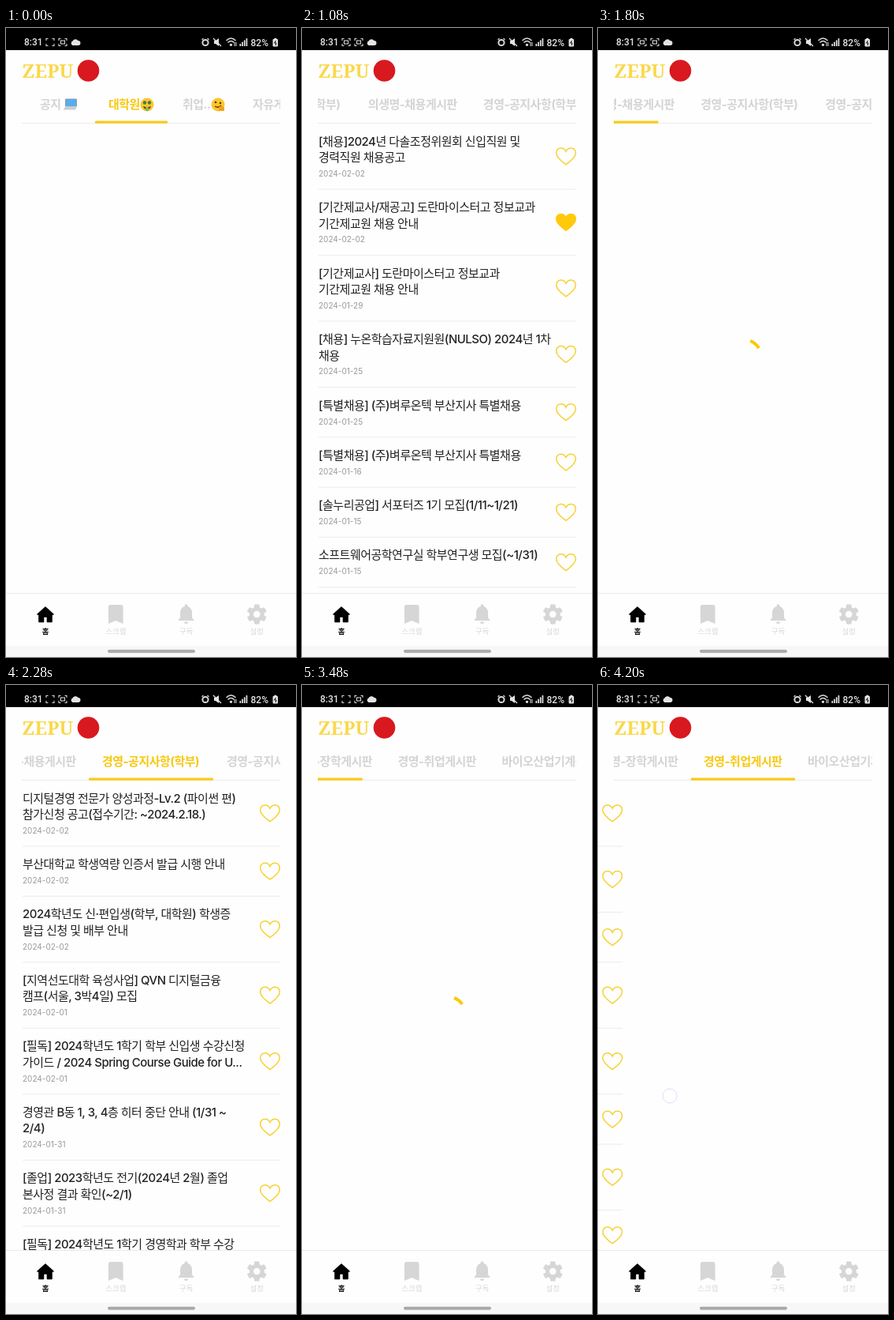
Recreate the animation shown at these times as an HTML page. Size 368 by 796 pixels, loop 4320 ms.

```html
<!DOCTYPE html>
<html lang="ko">
<head>
<meta charset="utf-8">
<title>게시판</title>
<style>
html, body { margin: 0; width: 100%; height: 100%; overflow: hidden; background: #fefefe; }
svg { display: block; }
text { font-family: Inter, "Noto Sans CJK KR", "Noto Sans CJK", sans-serif; white-space: pre; }
.title { font-size: 15px; font-weight: 500; letter-spacing: -.5px; fill: #222; }
.date { font-size: 10px; fill: #999; }
.tab { font-size: 15px; font-weight: 700; letter-spacing: -.5px; fill: #d4d4d4; }
.tab.on { fill: #f7c810; }
.nav { font-size: 9.5px; text-anchor: middle; fill: #d8d8d8; }
.status { font: 500 12px Roboto, sans-serif; fill: #e4e4e4; }
.logo { font: 600 24px "Noto Serif", serif; fill: #fbd84c; }
</style>
</head>
<body>
<svg id="stage" width="368" height="796" viewBox="0 0 368 796"></svg>
<script>
const LOOP = 4320, STEP = 120, TAP = 280, YELLOW = '#f7cb1c';

// label, label x, tab x, tab width
const tabs = [
  ['공지', 43, 21, 92], ['대학원', 130, 113, 92], ['취업..', 224, 205, 92],
  ['자유게시판', 313, 297, 121], ['의생명-공지사항(학부)', 434, 418, 171],
  ['의생명-채용게시판', 606, 589, 146], ['경영-공지사항(학부)', 752, 735, 158],
  ['경영-공지사항(대학원)', 910, 893, 172], ['경영-장학게시판', 1081, 1065, 132],
  ['경영-취업게시판', 1213, 1197, 132], ['바이오산업기계공학과', 1345, 1329, 190]
];

// A title with "|" takes two lines; a leading "*" marks a saved post.
const lists = [
  { from: 480, to: 1680, posts: [
    ['[채용]2024년 다솔조정위원회 신입직원 및|경력직원 채용공고', '2024-02-02'],
    ['*[기간제교사/재공고] 도란마이스터고 정보교과|기간제교원 채용 안내', '2024-02-02'],
    ['[기간제교사] 도란마이스터고 정보교과|기간제교원 채용 안내', '2024-01-29'],
    ['[채용] 누온학습자료지원원(NULSO) 2024년 1차|채용', '2024-01-25'],
    ['[특별채용] (주)벼루온텍 부산지사 특별채용', '2024-01-25'],
    ['[특별채용] (주)벼루온텍 부산지사 특별채용', '2024-01-16'],
    ['[솔누리공업] 서포터즈 1기 모집(1/11~1/21)', '2024-01-15'],
    ['소프트웨어공학연구실 학부연구생 모집(~1/31)', '2024-01-15']] },
  { from: 2100, to: 3370, posts: [
    ['디지털경영 전문가 양성과정-Lv.2 (파이썬 편)|참가신청 공고(접수기간: ~2024.2.18.)', '2024-02-02'],
    ['부산대학교 학생역량 인증서 발급 시행 안내', '2024-02-02'],
    ['2024학년도 신·편입생(학부, 대학원) 학생증|발급 신청 및 배부 안내', '2024-02-02'],
    ['[지역선도대학 육성사업] QVN 디지털금융|캠프(서울, 3박4일) 모집', '2024-02-01'],
    ['[필독] 2024학년도 1학기 학부 신입생 수강신청|가이드 / 2024 Spring Course Guide for U...', '2024-02-01'],
    ['경영관 B동 1, 3, 4층 히터 중단 안내 (1/31 ~|2/4)', '2024-01-31'],
    ['[졸업] 2023학년도 전기(2024년 2월) 졸업|본사정 결과 확인(~2/1)', '2024-01-31'],
    ['[필독] 2024학년도 1학기 경영학과 학부 수강|신청 안내', '2024-01-31']] },
  { from: 3720, to: LOOP, posts: [
    ['[채용] 2024년 상반기 신입사원 공개채용|안내', '2024-02-02'],
    ['[인턴] 2024년 동계 체험형 청년인턴 모집|공고', '2024-02-01'],
    ['[채용] 경영지원 직무 신입사원 모집', '2024-01-31'],
    ['[추천채용] 회계 및 재무 분야 신입직원|추천 안내', '2024-01-30'],
    ['[채용설명회] 2024년 상반기 온라인|채용설명회 참가 안내', '2024-01-29'],
    ['[채용] 마케팅 직무 신입사원 모집', '2024-01-26'],
    ['[교육] 취업준비생을 위한 직무역량 강화|과정 모집', '2024-01-25'],
    ['[인턴] 해외영업 직무 인턴사원 모집', '2024-01-24']] }
];

// start, duration, easing power, scroll position of the tab strip
const scrolls = [
  [120, TAP, 2, 66.5], [600, 960, 2.7, 605], [1680, TAP, 2, 630],
  [2280, 960, 3, 1113], [3370, TAP, 2, 1079]
];
const taps = [[120, 2], [1680, 6], [3370, 9]]; // time, tab

const text = (cls, x, y, s) => `<text class="${cls}" x="${x}" y="${y}">${s}</text>`;
const at = (x, y, s, scale = 1) => `<g transform="translate(${x} ${y}) scale(${scale})">${s}</g>`;
const path = (d, attrs = '') => `<path d="${d}" ${attrs}/>`;
const dot = (x, y, r, attrs = '') => `<circle cx="${x}" cy="${y}" r="${r}" ${attrs}/>`;
const rect = (x, y, w, h, fill, attrs = '') =>
  `<rect x="${x}" y="${y}" width="${w}" height="${h}" fill="${fill}" ${attrs}/>`;

const HEART = 'M0 10.5C-5 7-12.3 2-12.3-4C-12.3-8-9.5-10.3-6.5-10.3C-3.5-10.3-1-8.3 0-6' +
  'C1-8.3 3.5-10.3 6.5-10.3C9.5-10.3 12.3-8 12.3-4C12.3 2 5 7 0 10.5Z';

function listMarkup({ posts }) {
  let top = 120.5;
  return posts.map(([title, date]) => {
    const saved = title[0] === '*';
    const lines = title.replace('*', '').split('|');
    const height = lines.length > 1 ? 83.5 : 63.3;
    const out = lines.map((s, i) => text('title', 21, top + 28 + i * 20.5, s)).join('') +
      text('date', 21, top + height - 16.3, date) +
      at(335, top + height / 2, path(HEART,
        `fill="${saved ? '#ffc90c' : 'none'}" stroke="${saved ? '#ffc90c' : '#f8d034'}" stroke-width="1.5"`)) +
      rect(21, top + height - .5, 327, 1, '#ececec');
    top += height;
    return out;
  }).join('');
}

function emojiMarkup() {
  const face = dot(0, 0, 8.5, 'fill="#fcc62d"');
  const laptop = rect(-7, -7, 15, 10, '#8b9aa8', 'rx="1"') + rect(-6, -6, 13, 8, '#55aef0') +
    path('M-7 3H8L6 7H-9Z', 'fill="#c5ced6"');
  const money = face + dot(-3, -2.5, 2.2, 'fill="#3d7f42"') + dot(3, -2.5, 2.2, 'fill="#3d7f42"') +
    path('M-5 2Q0 4 5 2Q4 6 0 6T-5 2Z', 'fill="#6b3a16"') + rect(-2, 3, 4, 5, '#7dba62', 'rx="1"');
  const melt = face + dot(-3, -3, 1.3, 'fill="#5c3512"') + dot(3, -2, 1.3, 'fill="#5c3512"') +
    path('M-4 2Q0 5 4 1', 'fill="none" stroke="#5c3512" stroke-width="1.3"') +
    path('M1 8V3L5 1 8 4V8Z', 'fill="#eda51e"');
  const victory = path('M-2 1L-4-7M2 1L5-7', 'stroke="#f6bd42" stroke-width="3.2" stroke-linecap="round"') +
    rect(-5, -1, 10, 9, '#f6bd42', 'rx="4"') + path('M-4 3L2 2', 'stroke="#d99425" stroke-width="1.2"');
  return at(82, 96.5, laptop) + at(179, 97, money) + at(269, 97, melt) + at(392.5, 97, victory);
}

function statusMarkup() {
  const corners = x => path(`M${x} 16v-2.500h2.500m5 0h2.500v2.500m0 4v2.500h-2.500m-5 0h-2.500v-2.500`);
  const bars = [0, 1, 2, 3].map(i => rect(296.5 + i * 2.7, 20 - i * 2.3, 1.7, 3 + i * 2.3, '#e4e4e4')).join('');
  return rect(0, 0, 368, 28, '#000') + text('status', 23, 22.3, '8:31') +
    `<g fill="none" stroke="#d8d8d8" stroke-width="1.1">${corners(51)}${corners(67)}
      <rect id="blink" x="53.5" y="16" width="5" height="4"/><rect x="69.500" y="16" width="5" height="4"/>
      ${path('M279.500 16Q285.500 10 291.500 16M281.500 18.500Q285.500 14.500 289.500 18.500', 'stroke-width="1.5"')}
      ${dot(253, 18.5, 3.6, 'stroke-width="2"')}${path('M248.500 15l2-2m5 0l2 2')}
    </g>` +
    path('M84.500 22a3 3 0 0 1 0-5.500a4 4 0 0 1 7-.5a3 3 0 0 1 0 6z', 'fill="#e4e4e4"') +
    path('M264 16h2l4-3v10l-4-3h-2z', 'fill="#e4e4e4"') +
    path('M263 13l10 10', 'stroke="#e4e4e4" stroke-width="1.3"') +
    dot(285.5, 21.3, 1.6, 'fill="#e4e4e4"') + path('M290 18v5m2-5v5', 'stroke="#e4e4e4"') +
    bars + text('status', 310.5, 22.5, '82%') +
    rect(338.5, 14, 6.5, 9.5, '#e4e4e4', 'rx="1"') + rect(340.3, 12.8, 3, 2, '#e4e4e4') +
    path('M342.500 16l-2 3h2.500l-1 3', 'fill="none" stroke="#000"');
}

function navMarkup() {
  const teeth = [0, 60, 120, 180, 240, 300].map(a =>
    rect(-3.3, -12.6, 6.6, 5, '#d6d6d6', `rx="1" transform="rotate(${a})"`)).join('');
  const gear = teeth + dot(0, 0, 6.9, 'fill="none" stroke="#d6d6d6" stroke-width="5.2"');
  const home = path('M-2.500 9.500V3H2.500V9.500H8V0H10L0-9-10 0H-8V9.500Z',
    'stroke="#000" stroke-width="1.6" stroke-linejoin="round"');
  const bookmark = path('M-9.300 12V-9.500Q-9.300-12-6.800-12H6.800Q9.300-12 9.300-9.500V12L0 8Z');
  const bell = path('M-9.800 8V6.800L-7.500 4.500V-2C-7.500-6-5.500-9-1.900-10V-10.800A1.900 1.900 0 0 1 1.900-10.800V-10' +
    'C5.500-9 7.500-6 7.500-2V4.500L9.800 6.800V8ZM-2.500 9.500H2.500A2.500 2.500 0 0 1-2.500 9.500Z');
  const labels = ['홈', '스크랩', '구독', '설정'].map((s, i) =>
    text('nav', 50 + i * 89.4, 767, s)).join('');
  return rect(0, 715, 368, 81, '#fefefe') + rect(0, 715, 368, 1, '#ebebeb') +
    at(50, 742, home) + `<g fill="#d6d6d6">${at(139.3, 742, bookmark)}${at(228.6, 742, bell)}</g>` +
    at(318.3, 742, gear) + labels.replace('class="nav"', 'class="nav" style="fill:#111;font-weight:600"') +
    rect(0, 782, 368, 14, '#f7f7f7') + rect(129, 786.7, 111, 4, '#a9a9a9', 'rx="2"');
}

const $ = id => document.getElementById(id);
$('stage').innerHTML = `
  ${rect(0, 0, 368, 796, '#fefefe')}
  ${lists.map((list, i) => `<g id="list${i}">${listMarkup(list)}</g>`).join('')}
  <path id="spinner" fill="none" stroke="#fbc910" stroke-width="4"/>
  ${statusMarkup()}
  ${text('logo', 20.5, 62.5, 'ZEPU')}${dot(104.5, 54, 13.8, 'fill="#d8191f"')}
  ${rect(20, 120, 328, 1, '#f0eaea')}
  <svg x="20" y="80" width="328" height="42" viewBox="20 80 328 42"><g id="strip">
    ${tabs.map(([s, x]) => text('tab', x, 102, s)).join('')}${emojiMarkup()}
    <rect id="underline" y="117.500" height="3.200" rx="1" fill="${YELLOW}"/>
  </g></svg>
  ${navMarkup()}
  <circle id="touch" r="9" fill="#fff" fill-opacity=".6" stroke="#a9b0e6"/>`;
const labels = document.querySelectorAll('.tab');

const progress = (t, start, duration) => Math.min(1, Math.max(0, (t - start) / duration));
const easeOut = (t, start, duration, power = 2) => 1 - (1 - progress(t, start, duration)) ** power;
const set = (id, attrs) => Object.entries(attrs).forEach(([k, v]) => $(id).setAttribute(k, v));
const show = (id, on) => $(id).style.display = on ? '' : 'none';

function spinnerArc(age) {
  const smooth = u => u * u * (3 - 2 * u);
  const turn = 20 + age * .02;
  const tail = turn + 270 * smooth(progress(age, 667, 667));
  const head = turn + 12 + 270 * smooth(progress(age, 0, 667));
  const point = a => `${184 + 24 * Math.sin(a * Math.PI / 180)} ${418 - 24 * Math.cos(a * Math.PI / 180)}`;
  return `M${point(tail)}A24 24 0 ${head - tail > 180 ? 1 : 0} 1 ${point(head)}`;
}

function draw(t) {
  let scroll = 0, active = 1, [, , left, width] = tabs[1];
  for (const [start, duration, power, to] of scrolls)
    scroll += (to - scroll) * easeOut(t, start, duration, power);
  for (const [time, tab] of taps) {
    const p = easeOut(t, time, TAP);
    left += (tabs[tab][2] - left) * p;
    width += (tabs[tab][3] - width) * p;
    if (p === 1) active = tab;
  }
  set('strip', { transform: `translate(${-scroll} 0)` });
  set('underline', { x: left, width });
  labels.forEach((label, i) => label.classList.toggle('on', i === active));

  const swipe = 368 * easeOut(t, 3960, 383);
  lists.forEach((list, i) => show('list' + i, t >= list.from && t < list.to));
  set('list2', { transform: `translate(${-swipe} 0)` });

  const loading = taps.findIndex(([time], i) => t >= time && t < lists[i].from);
  show('spinner', loading >= 0);
  if (loading >= 0) set('spinner', { d: spinnerArc(t - taps[loading][0]) });

  const dragging = t >= 600 && t < 760, swiping = t >= 3960;
  show('touch', dragging || swiping);
  if (dragging) set('touch', { cx: 307.5 - scroll, cy: 107.5, opacity: 1 });
  if (swiping) set('touch', { cx: 330 - swipe * .754, cy: 520, opacity: 1 - .6 * progress(t, 4080, 120) });

  show('blink', t >= 960 && t < 2280);
}

function frame() {
  draw(Math.floor(performance.now() % LOOP / STEP) * STEP);
  requestAnimationFrame(frame);
}
frame();
</script>
</body>
</html>
```
